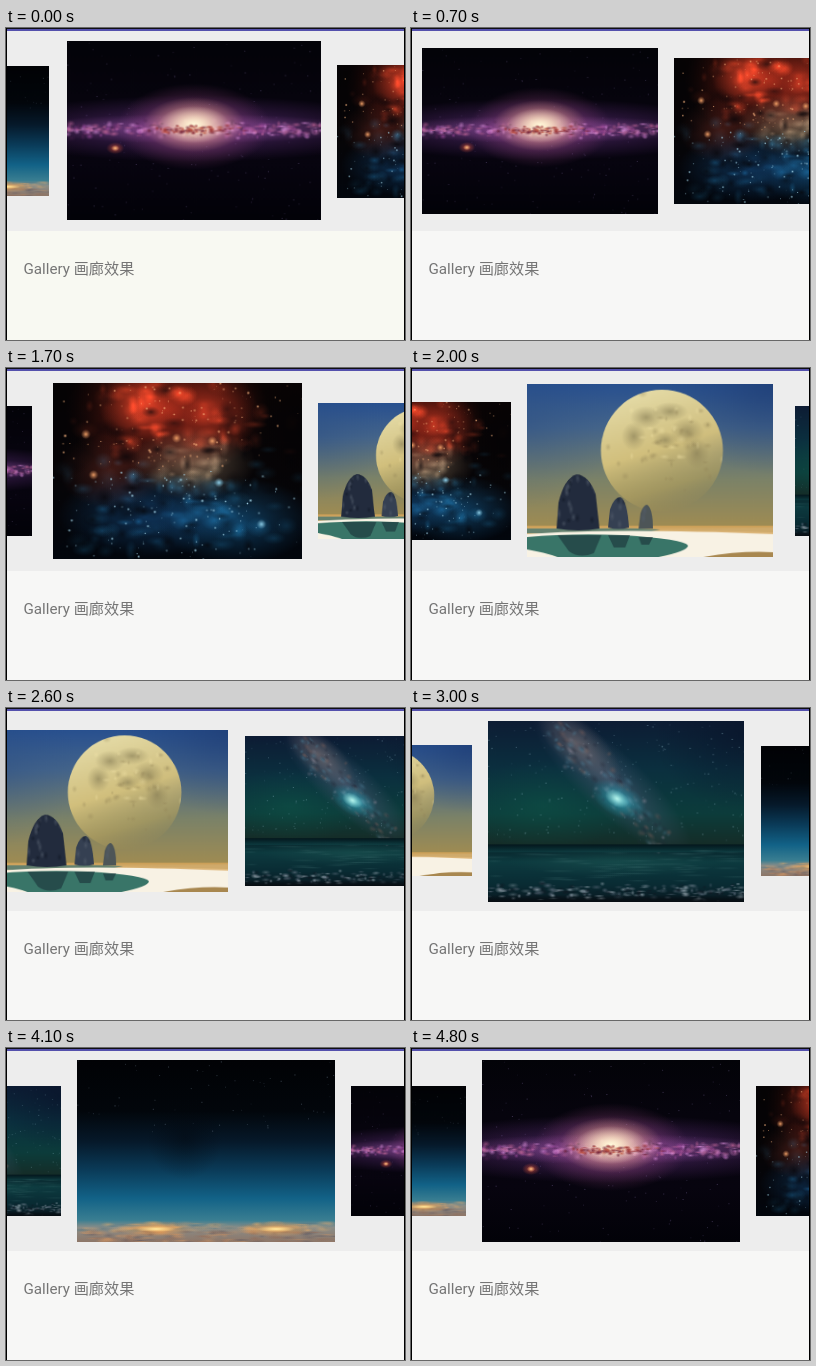
These frames come from a looping animation (399x312 px, 5.5 s). An HTML page with a canvas:

```html
<!DOCTYPE html>
<html lang="zh">
<head>
<meta charset="utf-8">
<title>Gallery</title>
<style>
html, body { margin: 0; width: 100%; height: 100%; overflow: hidden; }
canvas, svg { position: absolute; left: 0; top: 0; display: block; }
text { font: 15.2px Roboto, "Noto Sans CJK SC", "Noto Sans CJK", sans-serif; fill: #757575; }
</style>
</head>
<body>
<canvas id="stage" width="399" height="312"></canvas>
<svg width="399" height="312"><text x="17.4" y="246">Gallery 画廊效果</text></svg>
<script>
const W = 258, H = 182, PITCH = 237, LOOP = 5500;
const ctx = document.getElementById('stage').getContext('2d');

let seed = 7;
const rnd = (a = 0, b = 1) => {
  seed = (seed * 16807) % 2147483647;
  return a + (b - a) * seed / 2147483647;
};
const bell = () => rnd(-1) + rnd(-1) + rnd(-1) - 0; // roughly normal
const pick = list => list[Math.floor(rnd(0, list.length))];

function picture(paint) {
  const c = document.createElement('canvas');
  c.width = W;
  c.height = H;
  const g = c.getContext('2d');
  g.beginPath();
  g.rect(0, 0, W, H);
  g.clip();
  paint(g);
  return c;
}

function ramp(g, stops, y0 = 0, y1 = H) {
  const r = g.createLinearGradient(0, y0, 0, y1);
  stops.forEach(([at, color]) => r.addColorStop(at, color));
  g.fillStyle = r;
  g.fillRect(0, y0, W, y1 - y0);
}

// Soft elliptical glow; rgb is "r,g,b"
function glow(g, x, y, rx, ry, rgb, alpha = 1, turn = 0) {
  g.save();
  g.translate(x, y);
  g.rotate(turn);
  g.scale(rx, ry);
  const r = g.createRadialGradient(0, 0, 0, 0, 0, 1);
  r.addColorStop(0, `rgba(${rgb},${alpha})`);
  r.addColorStop(.5, `rgba(${rgb},${alpha * .45})`);
  r.addColorStop(1, `rgba(${rgb},0)`);
  g.fillStyle = r;
  g.fillRect(-1, -1, 2, 2);
  g.restore();
}

function stars(g, n, bottom, rgb = '200,210,230', strength = .6) {
  for (let i = 0; i < n; i++) {
    g.fillStyle = `rgba(${rgb},${rnd(.1, strength)})`;
    g.fillRect(rnd(0, W), rnd(0, bottom), 1, 1);
  }
}

function shape(g, color, path) {
  g.fillStyle = color;
  g.fill(new Path2D(path));
}

const galaxy = picture(g => {
  ramp(g, [[0, '#030308'], [.3, '#06040d'], [.7, '#07040f'], [1, '#020208']]);
  stars(g, 130, H, '150,130,190', .4);
  glow(g, 129, 89, 215, 34, '110,55,140', .75);
  glow(g, 129, 89, 175, 15, '170,95,180', .6);
  glow(g, 129, 87, 78, 44, '165,75,140', .8);
  for (let i = 0; i < 330; i++) {
    const x = rnd(0, W), y = 90 + bell() * 3.5;
    glow(g, x, y, rnd(2, 6), rnd(1, 4), pick(['215,140,215', '150,70,150', '70,30,75', '190,100,150']), rnd(.3, .8));
  }
  glow(g, 129, 85, 52, 28, '255,190,150', .9);
  glow(g, 129, 85, 36, 19, '255,250,220', 1);
  for (let i = 0; i < 75; i++)
    glow(g, 129 + bell() * 20, 90 + bell() * 2, rnd(2, 5), rnd(1, 3), pick(['150,45,50', '190,80,60', '110,30,55']), .7);
  glow(g, 49, 109, 9, 6, '210,80,60', .8);
  glow(g, 49, 109, 4, 3, '255,190,130', 1);
});

const nebula = picture(g => {
  ramp(g, [[0, '#0a0404'], [.5, '#070507'], [1, '#02060d']]);
  g.globalCompositeOperation = 'lighter';
  glow(g, 118, 28, 105, 70, '150,35,20', .75);
  glow(g, 92, 22, 45, 40, '220,70,40', .6);
  glow(g, 165, 30, 48, 45, '170,50,30', .55);
  glow(g, 60, 90, 55, 40, '95,35,25', .6);
  glow(g, 145, 83, 65, 38, '130,110,85', .7);
  glow(g, 100, 136, 95, 44, '15,65,110', .75);
  glow(g, 190, 142, 80, 45, '15,75,115', .75);
  for (let i = 0; i < 160; i++) {
    const x = 130 + bell() * 62, y = rnd(0, 175);
    const warm = y < 72 + bell() * 10;
    const rgb = y > 65 && y < 100 && Math.abs(x - 140) < 45 ? '190,165,130' : warm ? '200,65,35' : '30,110,150';
    glow(g, x, y, rnd(4, 15), rnd(3, 11), rgb, rnd(.1, .35));
  }
  g.globalCompositeOperation = 'source-over';
  for (let i = 0; i < 55; i++)
    glow(g, 130 + bell() * 65, rnd(5, 175), rnd(5, 16), rnd(4, 11), '5,4,8', rnd(.3, .7));
  glow(g, 0, 20, 55, 95, '4,3,5', .95);
  glow(g, 258, 45, 55, 75, '4,3,5', .95);
  for (let i = 0; i < 270; i++) {
    const x = 130 + bell() * 70, y = rnd(0, H), r = rnd(.6, 2);
    glow(g, x, y, r, r, y < 90 ? '255,185,130' : '170,220,240', rnd(.3, 1));
  }
  [[34, 53], [42, 95], [128, 57], [165, 60], [172, 103], [216, 146]].forEach(([x, y]) =>
    glow(g, x, y, 5, 5, y < 100 ? '255,170,110' : '150,215,240', .9));
});

const moon = picture(g => {
  ramp(g, [[0, '#28508f'], [.25, '#45658a'], [.55, '#7b8268'], [.83, '#a08c52'], [1, '#b49a60']]);
  glow(g, 258, 0, 120, 95, '30,60,115', .7);
  glow(g, 0, 40, 90, 90, '40,75,130', .4);
  const disc = g.createLinearGradient(110, 6, 150, 136);
  disc.addColorStop(0, '#e6dda9');
  disc.addColorStop(.5, 'rgba(215,195,125,.95)');
  disc.addColorStop(.8, 'rgba(178,160,95,.65)');
  disc.addColorStop(1, 'rgba(160,142,84,0)');
  g.save();
  g.beginPath();
  g.arc(141.5, 70, 64, 0, 7);
  g.clip();
  g.fillStyle = disc;
  g.fillRect(70, 0, 150, 140);
  [[125, 35, 17, 12], [150, 29, 19, 10], [168, 50, 18, 15], [145, 59, 13, 9], [112, 55, 13, 15], [178, 73, 13, 16]]
    .forEach(([x, y, rx, ry]) => glow(g, x, y, rx, ry, '135,125,85', .65));
  for (let i = 0; i < 60; i++)
    glow(g, 140 + bell() * 28, 60 + bell() * 24, rnd(2, 6), rnd(2, 5), pick(['245,230,170', '145,130,85']), .35);
  g.restore();
  ramp(g, [[0, '#c99d55'], [.35, '#e8c58f'], [1, '#e6d7b8']], 149, H);
  shape(g, '#64816f', 'M0 152H75Q105 151 140 153L120 157H0Z');
  shape(g, '#f8f2e4', 'M0 158Q90 151 258 158V182H0Z');
  shape(g, '#cfaa6b', 'M150 153L258 151V156Q205 154 150 153Z');
  shape(g, '#397568', 'M0 161Q45 157 100 159Q165 163 169 170Q168 176 138 182H32Q18 177 0 174Z');
  shape(g, 'rgba(28,55,60,.65)', 'M32 159H78L70 178Q55 184 44 176ZM85 159H108L103 172H91ZM117 161H132L128 169H120Z');
  shape(g, '#a8874f', 'M185 182Q225 175 258 177V182Z');
  const rocks = ['M31 152L33 125Q39 99 52 95Q65 96 72 116L76 152Q54 156 31 152Z',
    'M85 151L87 132Q91 119 98 119Q105 122 107 151Q96 154 85 151Z',
    'M117 152L119 136Q122 127 126 127Q132 131 132 152Z'];
  rocks.forEach((path, i) => {
    shape(g, ['#222b3d', '#354052', '#4d5557'][i], path);
    g.save();
    g.clip(new Path2D(path));
    for (let k = 0; k < 45; k++)
      glow(g, rnd(30, 133), rnd(95, 152), 3, rnd(3, 7), pick(['85,95,110', '15,22,35']), .55);
    g.restore();
  });
});

const sea = picture(g => {
  ramp(g, [[0, '#0d1c34'], [.4, '#0b303f'], [.75, '#0c3c3b'], [1, '#152d28']], 0, 124);
  ramp(g, [[0, '#061d24'], [.3, '#0d3a3f'], [.7, '#092b33'], [1, '#091820']], 124, H);
  glow(g, 55, 85, 90, 45, '15,90,75', .45);
  glow(g, 258, 15, 90, 75, '8,18,40', .6);
  stars(g, 190, 120, '150,190,205', .6);
  glow(g, 125, 62, 105, 31, '70,85,110', .8, .74);
  glow(g, 92, 25, 54, 23, '125,112,115', .65, .74);
  for (let i = 0; i < 150; i++) {
    const d = rnd(-80, 75), off = bell() * 9;
    glow(g, 127 + d * .74 - off * .67, 69 + d * .8 + off * .67, rnd(2, 7), rnd(2, 4),
      pick(['145,140,155', '35,40,55', '75,125,150', '125,95,90']), rnd(.2, .5), .74);
  }
  glow(g, 132, 79, 30, 17, '40,170,190', .85, .5);
  glow(g, 130, 78, 13, 8, '190,250,240', .95, .5);
  ramp(g, [[0, '#04161c'], [1, '#0d3a3f']], 124, 132);
  glow(g, 130, 142, 110, 15, '35,95,90', .4);
  for (let i = 0; i < 50; i++)
    glow(g, rnd(0, W), rnd(130, 162), rnd(8, 25), 1.2, '70,120,120', .25);
  for (let i = 0; i < 210; i++)
    glow(g, rnd(0, W), 172 + bell() * 4, rnd(2, 6), rnd(1, 3), pick(['155,170,180', '90,105,120', '15,25,35']), rnd(.3, .8));
  ramp(g, [[0, 'rgba(5,10,15,0)'], [1, '#080d12']], 175, H);
});

const earth = picture(g => {
  ramp(g, [[0, '#010205'], [.28, '#02060b'], [.45, '#06192a'], [.6, '#0a3a57'], [.76, '#126287'], [.88, '#3a7e91'], [.92, '#8a8d88'], [1, '#8d7668']]);
  stars(g, 60, 75, '150,170,190', .45);
  glow(g, 108, 78, 38, 42, '2,7,14', .45);
  for (let i = 0; i < 210; i++) {
    const y = rnd(163, 183);
    glow(g, rnd(0, W), y, rnd(4, 13), rnd(1, 3.5),
      pick(y < 171 ? ['195,160,120', '90,120,130', '220,170,110'] : ['145,110,92', '90,85,95', '200,145,100']), rnd(.3, .7));
  }
  [79, 199].forEach(x => {
    glow(g, x, 169, 40, 8, '245,160,75', .9);
    glow(g, x, 169, 20, 3, '255,235,160', 1);
  });
});

const pictures = [galaxy, nebula, moon, sea, earth];

// Each swipe: start time, number of 100 ms steps, progress at the first step
const swipes = [[700, 5, .3], [1700, 8, .12], [2600, 7, .388], [3500, 7, .595], [4200, 7, .36]];

function scroll(t) {
  let pos = .05;
  swipes.forEach(([start, steps, first], i) => {
    if (t < start) return;
    const k = Math.min(1, Math.floor((t - start) / 100) / (steps - 1));
    pos = i + 1 - (1 - first) * (1 - k) ** 3;
  });
  return pos;
}

function box(color, x, y, w, h) {
  ctx.fillStyle = color;
  ctx.fillRect(x, y, w, h);
}

function draw(now) {
  const t = now % LOOP, pos = scroll(t);
  box(t < 700 ? '#f8f9f2' : '#f7f7f6', 0, 0, 399, 312);
  box('#ededed', 0, 0, 399, 203);
  const base = Math.floor(pos);
  for (let i = base - 1; i <= base + 2; i++) {
    const d = i - pos;
    const s = 1 - .286 * Math.min(1, Math.abs(d));
    const x = Math.round(200 + d * PITCH - W * s / 2);
    const y = Math.round(103 - H * s / 2);
    ctx.drawImage(pictures[(i + 5) % 5], x, y, Math.round(W * s), Math.round(H * s));
  }
  box('#5551ad', 0, 1, 399, 2);
  box('#101014', 0, 0, 399, 1);
  box('#000', 0, 0, 1, 312);
  box('#000', 398, 0, 1, 312);
}

const begin = performance.now();
function tick() {
  draw(performance.now() - begin);
  requestAnimationFrame(tick);
}
tick();
</script>
</body>
</html>
```
